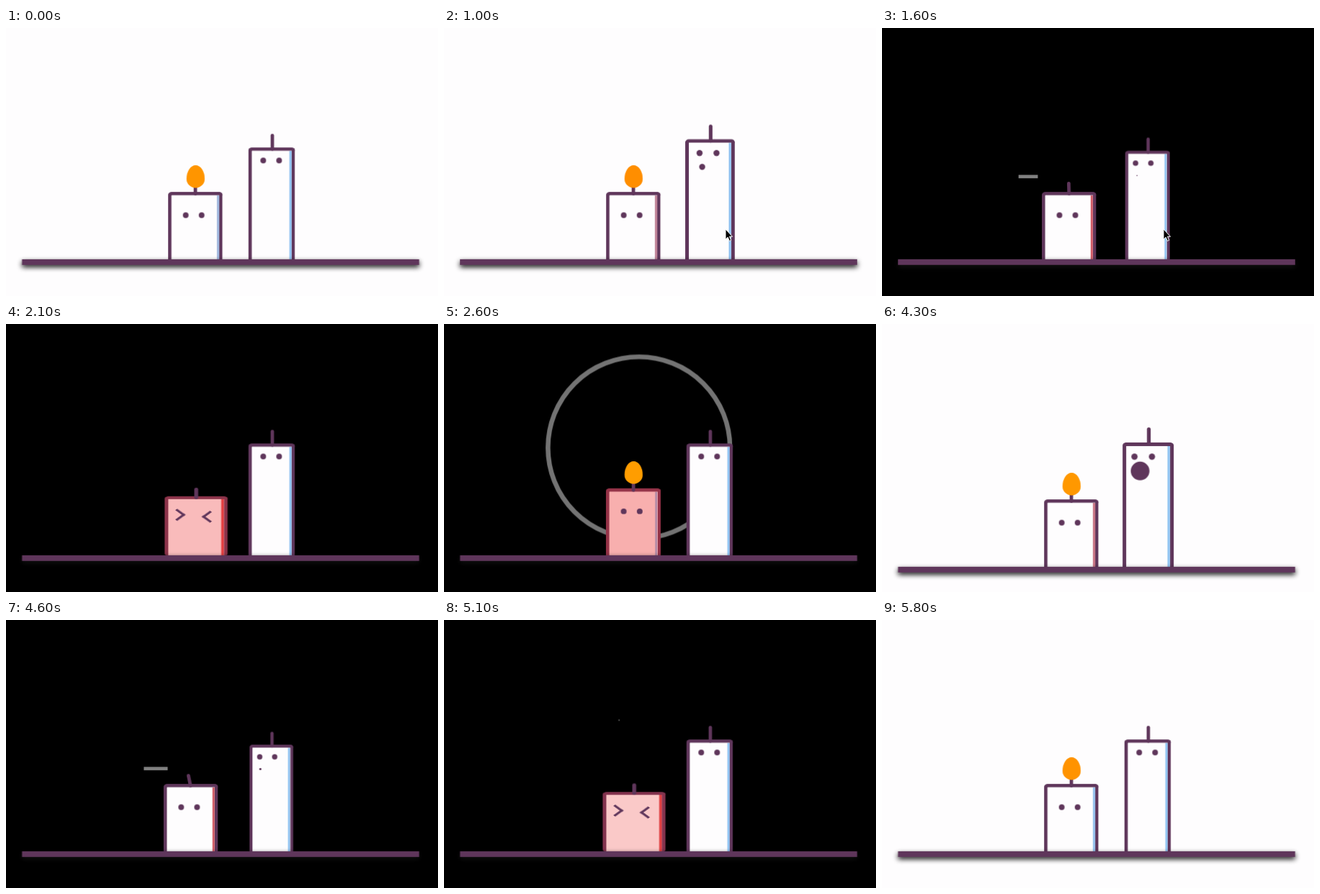
An HTML page that plays this animation: 600x373 px, repeating every 5900 ms.

```html
<!DOCTYPE html>
<html lang="en">
<head>
<meta charset="utf-8">
<title>Two candles</title>
<style>
:root { --ink: #5f365b; --paper: #fefdfe; --blue: #8fc3f2; --red: #ee2b26; }
html, body { margin: 0; width: 100%; height: 100%; overflow: hidden; }
body { position: relative; background: var(--paper); }
div { position: absolute; }

/* Every part runs on the same 3 s cycle; the script sets the time. */
body, .anim { animation: 3s linear infinite paused; }
body { animation-name: dark; }

#scene { left: 297.7px; top: 325px; transform: scale(1.576); }
.floor { left: -175px; top: -2.5px; width: 350px; height: 5px; background: var(--ink); box-shadow: 0 2px 5px #111; }
.candles { left: -125px; top: -150px; width: 250px; height: 150px; }

.candle {
  background: var(--paper); border: 3px solid var(--ink); border-bottom: 0; border-radius: 3px;
  box-shadow: inset -2px 0 0 var(--blue); transform-origin: center right;
}
.tall { left: 50%; top: 50%; width: 35px; height: 100px; animation-name: puff; }
.small { left: 20%; top: 65%; width: 42px; height: 60px; animation-name: shake; }
.wick { left: 50%; top: 0; width: 3px; height: 15px; background: var(--ink); border-radius: 8px; transform: translate(-50%, -100%); }
.small .wick { height: 12px; transform-origin: bottom center; animation-name: wick; }

.eye { width: 5px; height: 5px; border-radius: 50%; background: var(--ink); }
.tall .eye { top: 6px; animation-name: blink; }
.small .eye { top: 15px; animation-name: open; }
.squint { box-sizing: border-box; width: 9px; height: 9px; border: solid var(--ink); border-width: 0 2px 2px 0; animation-name: squint; }
.mouth { left: 40%; top: 20%; border-radius: 50%; background: var(--ink); transform: translate(-50%, -50%); animation-name: mouth; }

.fire { top: 50%; border-radius: 50% / 60% 60% 40% 40%; transform: translate(-50%, -50%); animation-name: fire; }
.gust, .smoke { left: 30%; background: grey; transform: translate(-50%, -50%); }
.gust { top: 50%; height: 3px; animation-name: gust; }
.smoke { border-radius: 50%; animation-name: smoke; }
.wave { left: 35%; top: 35%; width: 75px; height: 75px; border: 2px solid; border-radius: 50%; animation-name: wave; }
#cursor { position: absolute; left: 0; top: 0; }

@keyframes dark {
  0%, 59%, 98%, 100% { background: var(--paper); }
  61%, 97% { background: #000; }
}
@keyframes puff {
  0%, 40%, 65%, 75%, 100% { transform: scale(1) translate(60%, -25%); }
  45%, 55% { transform: scale(1.1) translate(60%, -28%); }
  60% { transform: scale(.89) translate(60%, -25%); }
  70% { transform: scale(.95) translate(60%, -25%); }
}
@keyframes blink {
  0%, 35%, 40% { opacity: 1; transform: translate(-70%); }
  36%, 39% { opacity: 0; transform: translate(-70%); }
  50%, 65% { transform: translate(-140%); }
  66%, 100% { opacity: 1; transform: translate(-70%); }
}
@keyframes mouth {
  0%, 40% { width: 0; height: 0; }
  50%, 54% { width: 15px; height: 15px; left: 30%; }
  59% { width: 5px; height: 5px; left: 20%; }
  62% { width: 2px; height: 2px; left: 20%; }
  67%, 100% { width: 0; height: 0; left: 30%; }
}
@keyframes shake {
  0%, 59% { left: 20%; transform: scale(1, 1) translate(60%, -15%); }
  62% { left: 18%; }
  65% { left: 21%; }
  67% { left: 20%; transform: scale(1, 1) translate(60%, -15%); }
  75% { transform: scale(1.15, .85) translate(60%, -15%); background: var(--paper); border-color: var(--ink); }
  91% { transform: scale(1.18, .82) translate(60%, -10%); background: var(--red); border-color: var(--red); box-shadow: inset -2px 0 0 var(--red); }
  92% { transform: scale(.85, 1.15) translate(60%, -15%); }
  95% { transform: scale(1.05, .95) translate(60%, -15%); }
  97%, 100% { left: 20%; transform: scale(1, 1) translate(60%, -15%); }
}
@keyframes wick {
  0%, 59%, 74%, 84% { transform: translate(-50%, -100%) rotate(0deg); }
  62% { transform: translate(-50%, -100%) rotate(-15deg); }
  65% { transform: translate(-50%, -100%) rotate(15deg); }
  70% { transform: translate(-50%, -100%) rotate(-5deg); }
  72% { transform: translate(-50%, -100%) rotate(5deg); }
  85% { transform: rotate(180deg) translate(0, 120%); }
  92%, 100% { transform: translate(-50%, -100%); }
}
@keyframes open {
  0%, 70%, 91%, 100% { opacity: 1; }
  70.1%, 90.9% { opacity: 0; }
}
@keyframes squint {
  0%, 70%, 91%, 100% { opacity: 0; }
  70.1%, 90.9% { opacity: 1; }
}
@keyframes fire {
  0%, 7%, 15%, 23%, 31%, 39%, 47%, 55%, 90%, 100% { left: 40.8%; width: 16px; height: 20px; background: #ffb400; }
  3%, 11%, 19%, 27%, 35%, 43%, 51%, 58%, 94% { left: 41.2%; width: 16px; height: 20px; background: #ff8a00; }
  59%, 89% { left: 40%; width: 0; height: 0; }
}
@keyframes gust {
  0%, 59%, 100% { width: 0; left: 40%; }
  60% { width: 30px; left: 30%; }
  68% { width: 0; left: 20%; }
}
@keyframes smoke {
  0%, 64%, 100% { width: 0; height: 0; top: 0; }
  65% { width: 10px; height: 10px; top: 40%; left: 40%; }
  80% { width: 0; height: 0; top: 20%; }
}
@keyframes wave {
  0%, 89% { transform: translate(-25%, -50%) scale(0); border-color: rgba(255, 255, 255, 0); }
  90% { transform: translate(-25%, -50%) scale(1); }
  95%, 96% { transform: translate(-25%, -50%) scale(2); border-color: rgba(255, 255, 255, .5); }
  100% { transform: translate(-25%, -50%) scale(2.5); border-color: rgba(255, 255, 255, .2); }
}
</style>
</head>
<body>
<div id="scene">
  <div class="candles">
    <div class="wave anim"></div>
    <div class="candle tall anim">
      <div class="wick"></div>
      <div class="eye anim" style="left:10.5px"></div>
      <div class="eye anim" style="left:24.5px"></div>
      <div class="mouth anim"></div>
    </div>
    <div class="candle small anim">
      <div class="wick anim"></div>
      <div class="eye anim" style="left:9.5px"></div>
      <div class="eye anim" style="left:24px"></div>
      <div class="squint anim" style="left:2.3px;top:12.4px;rotate:-45deg"></div>
      <div class="squint anim" style="left:27.4px;top:13.5px;rotate:135deg"></div>
    </div>
    <div class="fire anim"></div>
    <div class="gust anim"></div>
    <div class="smoke anim"></div>
  </div>
  <div class="floor"></div>
</div>
<svg id="cursor" width="600" height="373">
  <path d="M391 280V294.2L394.2 291.2L396.4 296.4L398.7 295.4L396.5 290.3H400.6Z" stroke="#fff"/>
</svg>
<script>
const LOOP = 5900, STEP = 100;
const scene = document.getElementById('scene');
const cursor = document.getElementById('cursor');
const parts = document.getAnimations();
const within = (t, from, to) => t >= from && t < to;

function draw() {
  let t = Math.floor(performance.now() % LOOP / STEP) * STEP;
  if (within(t, 100, 400)) t = 100; // short hold at the start
  const time = t + (t < 2800 ? 300 : 270);
  for (const part of parts) part.currentTime = time;
  scene.style.translate = within(t, 3000, 4400) ? '0 16px' : 'none';
  cursor.style.visibility = within(t, 500, 2100) ? 'visible' : 'hidden';
  requestAnimationFrame(draw);
}
draw();
</script>
</body>
</html>
```
